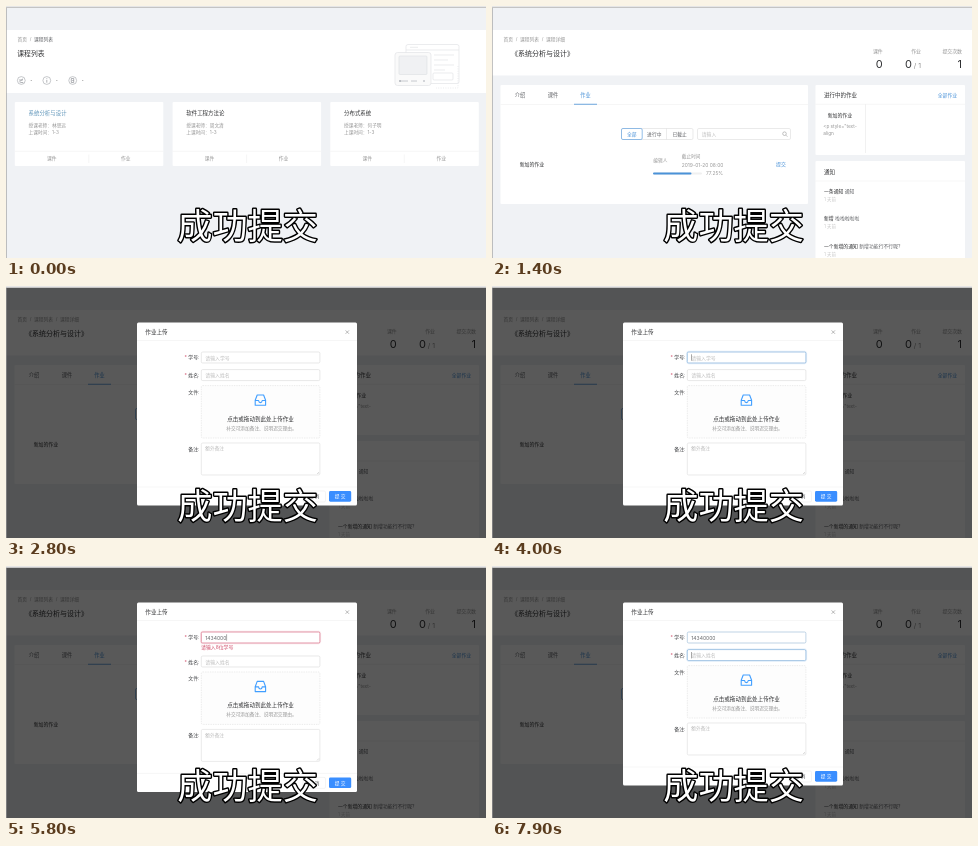
An HTML page for the animation above (8000 ms loop, 480x252 px).

```html
<!DOCTYPE html>
<html lang="zh-CN">
<head>
<meta charset="utf-8">
<title>作业上传</title>
<style>
html, body { margin: 0; width: 100%; height: 100%; overflow: hidden; background: #f0f2f5; }
svg { display: block; width: 480px; height: 252px; }
text { font-family: Inter, "Noto Sans CJK SC", "Noto Sans CJK", sans-serif; white-space: pre; }
</style>
</head>
<body>
<svg id="stage" viewBox="0 0 480 252"></svg>
<script>
const LOOP = 8000;
const INK = '#303133', GREY = '#969696', PALE = '#bfbfbf', LINE = '#ececec', BLUE = '#4a92d8', RED = '#d0506c';

const rect = (x, y, w, h, fill, more = '') =>
  `<rect x="${x}" y="${y}" width="${w}" height="${h}" fill="${fill}" ${more}/>`;
const line = (x1, y1, x2, y2, color = LINE, w = .5) =>
  `<path d="M${x1} ${y1}L${x2} ${y2}" stroke="${color}" stroke-width="${w}"/>`;
const text = (x, y, s, size = 5, fill = INK, more = '') =>
  `<text x="${x}" y="${y}" font-size="${size}" fill="${fill}" ${more}>${s}</text>`;
const MID = 'text-anchor="middle"', END = 'text-anchor="end"', BOLD = 'font-weight="500"';
const frame = (x, y, w, h, color = '#dcdcdc', more = '') =>
  rect(x, y, w, h, '#fff', `rx="1.4" stroke="${color}" stroke-width=".6" ${more}`);
const group = (id, body) => `<g id="${id}">${body}</g>`;
const crumbs = (...names) => text(11.5, 35.2, names.join('  /  '), 4.75, GREY);

function course(x, title, teacher, color = INK) {
  return rect(x, 96, 148.5, 64, '#fff', 'rx="1"') +
    text(x + 13.7, 109, title, 5.45, color, BOLD) +
    text(x + 13.7, 120.6, '授课老师：' + teacher, 4.7, GREY) +
    text(x + 13.7, 127.8, '上课时间：1-3', 4.7, GREY) +
    line(x, 145.3, x + 148.5, 145.3) + line(x + 74, 148.5, x + 74, 157) +
    text(x + 37, 154.3, '课件', 4.8, GREY, MID) + text(x + 111, 154.3, '作业', 4.8, GREY, MID);
}

function badge(x, mark) {
  return `<circle cx="${x}" cy="74.5" r="3.9" fill="none" stroke="#a0a3a8" stroke-width=".6"/>` +
    `<path d="${mark}" transform="translate(${x} 74.5)" fill="none" stroke="#909399" stroke-width=".7"/>` +
    rect(x + 9.4, 74, 1.2, .9, '#aaa');
}

const drawing = `<g fill="none" stroke="#e2e4e7" stroke-width=".7">
  <rect x="400" y="38.5" width="53" height="39" rx="2"/><path d="M400 44H453M428 49H448M428 54H442M428 59H448M428 64H439M404 41.3H412"/>
  <rect x="427" y="67" width="20" height="7" rx="1"/><path d="M452 60V82H430" stroke-dasharray="1 1.4"/>
  <rect x="389" y="46.5" width="36" height="33" rx="2.5" fill="#fafafa"/></g>` +
  rect(393, 50, 28, 18.5, '#f0f1f3', 'rx="1" stroke="#dcdfe3" stroke-width=".6"') +
  '<path d="M394 75H402M405 75H411" stroke="#c6c9ce"/><circle cx="394" cy="75" r="1" fill="#aeb2b8"/><circle cx="418" cy="75" r="1" fill="#c6c9ce"/>';

const list = rect(0, 24, 480, 63, '#fff') +
  crumbs('首页', '<tspan fill="#606266">课程列表</tspan>') +
  text(11.3, 49.6, '课程列表', 6.8, INK, BOLD) +
  badge(15.3, 'M-2 1.5L1.8 -1.8M-2.2 -.5H1.6M-1 2H2') + badge(40.8, 'M0 -2.2V-1.3M0 -.5V2.2') +
  badge(66.7, 'M-1.4 -2H1V2H-1.4ZM-.5 0H1') + drawing +
  course(8.8, '系统分析与设计', '林思远', '#5c93b8') +
  course(166.6, '软件工程方法论', '周文清') +
  course(324.3, '分布式系统', '何子明');

const stat = (x, label, value) => text(x, 47, label, 4.9, GREY, END) + text(x, 62, value, 11, INK, END);

const notice = (y, name, body) =>
  text(332, y, `<tspan font-weight="500">${name}</tspan> <tspan fill="#606266">${body}</tspan>`, 4.85) +
  text(332, y + 8, '1 天前', 4.4, '#c6c6c6');

const detail = rect(0, 24, 480, 45.5, '#fff') +
  crumbs('首页', '课程列表', '课程详细') +
  text(19, 50.3, '《系统分析与设计》', 7, INK, BOLD) +
  stat(390.7, '课件', '0') + stat(429, '作业', '0<tspan font-size="6.8" fill="#8c8c8c"> / 1</tspan>') + stat(470, '提交次数', '1') +
  rect(8.5, 79, 307.5, 119, '#fff', 'rx="1"') +
  text(28, 91.3, '介绍', 5.2, '#606266', MID) + text(61, 91.3, '课件', 5.2, '#606266', MID) +
  text(93.5, 91.3, '作业', 5.2, BLUE, MID + ' ' + BOLD) +
  line(8.5, 98.5, 316, 98.5) + rect(82, 97.8, 23, .8, BLUE) +
  frame(129.5, 122.5, 71.5, 11) + line(174.5, 122.5, 174.5, 133.5, '#d9d9d9') +
  frame(129.5, 122.5, 20.7, 11, BLUE) +
  text(139.8, 129.9, '全部', 4.8, BLUE, MID) + text(162.3, 129.9, '进行中', 4.8, '#606266', MID) +
  text(187.6, 129.9, '已截止', 4.8, '#606266', MID) +
  frame(205.5, 122.5, 93, 11) + text(209.8, 129.9, '请输入', 4.8, PALE) +
  '<path d="M294 129.2L295.4 130.7M294.3 127.7A1.8 1.8 0 1 1 290.7 127.7A1.8 1.8 0 1 1 294.3 127.7" fill="none" stroke="#999" stroke-width=".6"/>' +
  text(27.7, 159.7, '新加的作业', 4.9, INK, BOLD) +
  text(161.3, 155.8, '编辑人', 4.7, GREY) + text(189.8, 152.4, '截止时间', 4.7, GREY) +
  text(189.8, 161.3, '2019-01-20 08:00', 4.9, GREY) +
  rect(161, 166.5, 49, 2, '#f0f0f0', 'rx="1"') + rect(161, 166.5, 38.5, 2, BLUE, 'rx="1"') +
  text(214, 169.4, '77.25%', 4.9, GREY) + text(284, 160, '提交', 4.9, BLUE) +
  rect(323.5, 79, 149.5, 70, '#fff', 'rx="1"') +
  text(332, 91.2, '进行中的作业', 5.5, INK, BOLD) + text(465, 91, '全部作业', 4.8, BLUE, END) +
  line(323.5, 98.3, 473, 98.3) + group('edge', line(373.5, 98.3, 373.5, 147, '#e2e2e2')) +
  text(335.7, 111.4, '新加的作业', 4.9, INK, BOLD) +
  text(331.3, 122, '&lt;p style="text-', 4.7, GREY) + text(331.3, 129, 'align', 4.7, GREY) +
  rect(323.5, 155, 149.5, 100, '#fff', 'rx="1"') +
  text(332, 167.9, '通知', 5.5, INK, BOLD) + line(323.5, 175, 473, 175) +
  notice(186.5, '一条通知', '通知') +
  notice(214, '新增', '啦啦啦啦啦') +
  notice(241.5, '一个新增的通知', '新增功能行不行呢?');

const label = (y, s, needed) =>
  text(193.5, y, (needed ? `<tspan fill="${RED}">* </tspan>` : '') + s + ':', 4.9, '#404245', END);

const tray = '<path d="M249.2 114.3L251.2 109H257.6L259.6 114.3V119.2H249.2ZM249.2 114.5H252.6Q252.8 116.6 254.4 116.6Q256 116.6 256.2 114.5H259.6" fill="none" stroke="#409eff" stroke-width="1.1" stroke-linejoin="round"/>';

const field = (id, y) =>
  rect(194.6, y - .8, 120, 12.6, 'none', `id="${id}Glow" rx="2" stroke="${BLUE}" stroke-opacity=".12" stroke-width="1"`) +
  frame(195.3, y, 118.6, 11, '#d9d9d9', `id="${id}Box"`);

const modal = rect(131, 36.5, 220, 183, '#fff', 'id="sheet" rx="1.5"') +
  text(139.3, 47.5, '作业上传', 5.6, INK, BOLD) +
  '<path d="M339.6 44.4L343 47.8M343 44.4L339.6 47.8" stroke="#888" stroke-width=".6"/>' +
  line(131, 54.5, 351, 54.5) +
  label(73.4, '学号', true) + field('num', 66) +
  text(199.3, 73.5, '请输入学号', 4.9, PALE, 'id="hint"') + text(199.3, 73.5, '', 5, '#606265', 'id="digits"') +
  rect(0, 68.3, .5, 6.4, '#555', 'id="caret"') +
  text(195, 83, '请输入8位学号', 4.9, RED, 'id="error"') +
  group('lower',
    label(91.2, '姓名', true) + field('name', 83.6) + text(199.3, 91.2, '请输入姓名', 4.9, PALE) +
    rect(199, 86, .5, 6.4, '#555', 'id="nameCaret"') +
    label(107.6, '文件') + rect(195.3, 99.6, 118.6, 52.4, '#fdfdfd', 'rx="1.4" stroke="#e0e0e0" stroke-width=".6" stroke-dasharray="1.4 1"') +
    tray + text(254.5, 135, '点击或拖动到此处上传作业', 5.55, INK, MID) +
    text(220.3, 143.7, '补交可添加备注、说明迟交理由。', 4.7, GREY) +
    label(165, '备注') + frame(195.3, 157, 118.6, 32) + text(199.3, 164.4, '额外备注', 4.7, PALE) +
    '<path d="M311 188L313 186M312.3 188L313 187.3" stroke="#aaa" stroke-width=".4"/>' +
    line(131, 201, 351, 201) +
    frame(297, 205, 22.5, 11, '#ececec') + text(308.2, 212.4, '取 消', 4.8, '#606266', MID) +
    rect(323, 205, 22.2, 10.7, '#3a8eff', 'rx="1.4"') + text(334.2, 212.2, '提 交', 4.8, '#fff', MID));

const stage = document.getElementById('stage');
stage.innerHTML = rect(0, 0, 480, 252, '#f0f2f5') + group('list', list) + group('detail', detail) +
  rect(0, 2, 480, 250, '#000', 'id="mask"') + group('modal', modal) +
  rect(0, 0, 480, 1, '#e6e6e6') + rect(0, 1, 480, 1, '#c4c4c4') + rect(0, 2, .6, 250, '#999') +
  text(241.6, 233.4, '成功提交', 35.2, '#fff', `${MID} font-weight="400" stroke="#000" stroke-width="2.8" stroke-linejoin="round" paint-order="stroke"`);

const el = {};
stage.querySelectorAll('[id]').forEach(node => el[node.id] = node);
const set = (id, name, value) => el[id].setAttribute(name, value);
const show = (id, on) => set(id, 'opacity', +on);
const clamp = p => Math.min(1, Math.max(0, p));
const ramp = (t, from, to) => {
  const p = clamp((t - from) / (to - from));
  return p * p * (3 - 2 * p);
};
const mix = (a, b, p) => 'rgb(' + a.map((v, i) => Math.round(v + (b[i] - v) * p)) + ')';

const REST = [217, 217, 217], FOCUS = [104, 160, 212], WRONG = [208, 80, 108];
const KEYS = [4500, 4700, 4900, 5000, 5500, 5600, 5800, 6200];
const NUMBER = '14340000';

function draw(t) {
  show('list', t < 100);
  show('detail', t >= 100);
  show('edge', t < 1800);
  set('mask', 'opacity', .65 * clamp((t - 2675) / 125));
  show('modal', t >= 2800);

  const error = ramp(t, 4400, 4700) * (1 - ramp(t, 6150, 6450));
  const shift = 6.4 * error;
  set('lower', 'transform', `translate(0 ${shift})`);
  set('sheet', 'height', 183 + shift);
  show('error', error);

  const leave = ramp(t, 6350, 6700);
  const numFocus = ramp(t, 3250, 3550);
  const edge = mix(REST, FOCUS, numFocus * (1 - .4 * leave));
  set('numBox', 'stroke', error > .5 ? mix(REST, WRONG, error) : edge);
  set('numGlow', 'stroke', error > .5 ? RED : BLUE);
  show('numGlow', numFocus * (1 - leave));
  set('nameBox', 'stroke', mix(REST, FOCUS, leave));
  show('nameGlow', leave);

  const count = KEYS.filter(k => t >= k).length;
  el.digits.textContent = NUMBER.slice(0, count);
  show('hint', !count);
  set('caret', 'x', 199.3 + (count ? el.digits.getComputedTextLength() + .2 : 0));
  show('caret', t >= 3300 && t < 6400);
  show('nameCaret', t >= 6400);
}

function tick(now) {
  draw(now % LOOP);
  requestAnimationFrame(tick);
}
draw(0);
requestAnimationFrame(tick);
</script>
</body>
</html>
```
